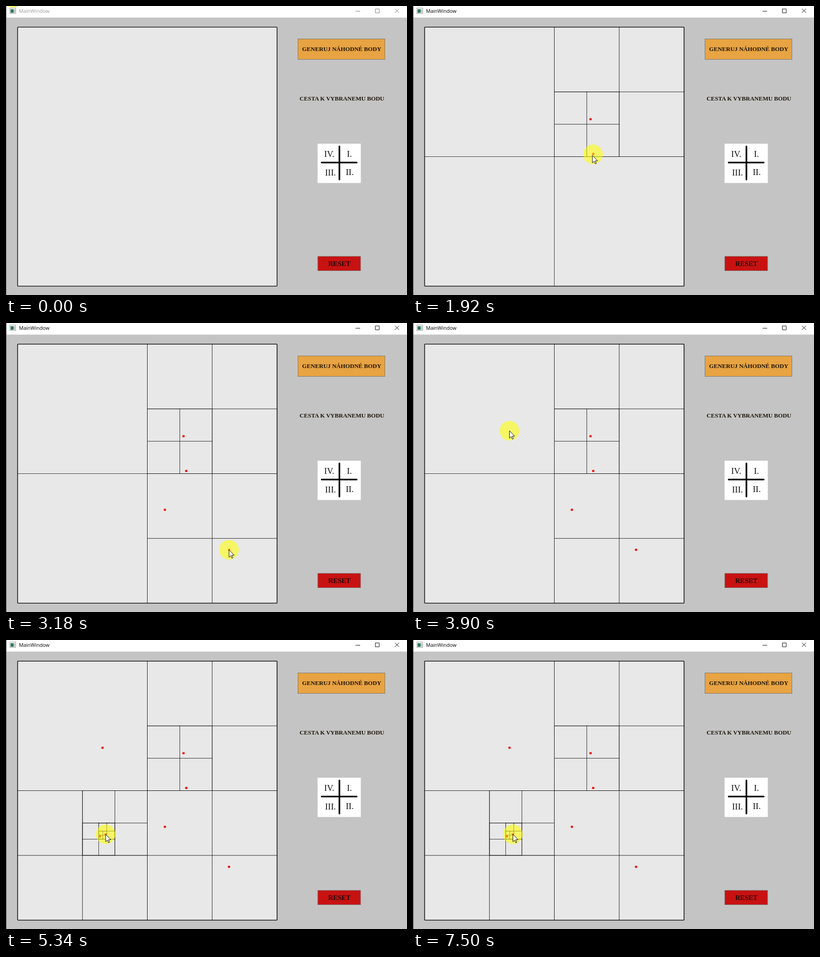
Animation of 881 by 636 pixels, one loop 8000 ms. Source, as an HTML page:

```html
<!DOCTYPE html>
<html lang="cs">
<head>
<meta charset="utf-8">
<title>MainWindow</title>
<style>
  html, body { margin: 0; width: 100%; height: 100%; overflow: hidden; background: #c4c4c4; }
  svg { display: block; width: 881px; height: 636px; }
  .caption { font: 11px "Open Sans", sans-serif; }
  .label { font: bold 13.1px "Liberation Serif", serif; text-anchor: middle; fill: #1c1408; }
  .roman { font: 19px "Liberation Serif", serif; fill: #111; }
  .reset { font-size: 15px; fill: #220505; }
</style>
</head>
<body>
<svg viewBox="0 0 881 636">
  <rect width="881" height="636" fill="#c4c4c4"/>
  <rect width="881" height="25.5" fill="#fff"/>
  <rect id="edge" width="1" height="636"/>

  <rect x="8.5" y="4.5" width="13" height="12" fill="#fff" stroke="#999"/>
  <rect x="10" y="7" width="7" height="8" fill="#2f7d62"/>
  <rect x="18" y="7" width="2" height="8" fill="#aaa"/>
  <text id="caption" class="caption" x="28.5" y="15">MainWindow</text>
  <path id="controls" fill="none" d="M768 11.5h10M811.5 6.5h8.5v8.5h-8.5zM854.5 6l9 9m0-9l-9 9"/>

  <rect id="board" rx="1" fill="#e8e8e8" stroke="#151515" stroke-width="1.6"/>
  <g id="cells" fill="none" stroke="#000" stroke-opacity=".5"/>
  <g id="dots" fill="#f80404"/>

  <rect x="641.5" y="72.5" width="191" height="45" fill="#e8a342" stroke="#7b766c"/>
  <text class="label" x="737.5" y="99">GENERUJ NÁHODNÉ BODY</text>
  <text class="label" x="738" y="208">CESTA K VYBRANEMU BODU</text>

  <rect x="684.5" y="303" width="95" height="86.5" fill="#fff"/>
  <path d="M732.5 309v73M693.5 344.5h77" stroke="#000" stroke-width="3.6" stroke-linecap="round"/>
  <g class="roman">
    <text x="699" y="332">IV.</text>
    <text x="749" y="332">I.</text>
    <text x="701" y="373">III.</text>
    <text x="746.5" y="372">II.</text>
  </g>

  <rect x="685" y="551" width="94" height="31.5" fill="#c81212" stroke="#7d6a6a"/>
  <text class="label reset" x="732.5" y="572">RESET</text>

  <circle id="halo" r="21.6" fill="#ff0" fill-opacity=".56"/>
  <path id="arrow" d="M0 0v16.5l3.8-3.6 2.5 5.7 2.3-1-2.5-5.6h5.2z" fill="#fff" stroke="#000"/>
</svg>
<script>
const LOOP = 8000, STEP = 60, HALO_LAG = 30;
const BOARD = { x: 25.5, y: 46.5, size: 570 };

// Places the pointer visits; those with a click time leave a point behind.
const stop = (x, y, leave, arrive, click) => ({ x, y, leave, arrive, click });
const stops = [
  stop(15, -18, 0, 0),
  stop(390, 249, 120, 450, 780),
  stop(396, 325.5, 780, 1500, 1560),
  stop(349, 411, 1860, 2370, 2460),
  stop(490, 499, 2580, 2850, 3180),
  stop(212, 237, 3480, 3870, 4020),
  stop(206.5, 432, 4020, 4440, 4500),
  stop(219, 427.5, 4860, 5010, 5340),
  stop(295, 513, 5700, 5970),
  stop(294, 494, 6180, 6300),
  stop(230, 428, 6360, 6990),
  stop(219.5, 427.5, 7140, 7320)
];
const clicks = stops.filter(s => s.click);

const byId = id => document.getElementById(id);
const edge = byId("edge"), caption = byId("caption"), controls = byId("controls");
const cells = byId("cells"), dots = byId("dots"), halo = byId("halo"), arrow = byId("arrow");

const ease = p => p * p * (3 - 2 * p);

// Each stop pulls the pointer away from the previous one.
function pointerAt(t) {
  let { x, y } = stops[0];
  for (const s of stops.slice(1)) {
    if (t <= s.leave) break;
    const k = ease(Math.min(1, (t - s.leave) / (s.arrive - s.leave)));
    x += (s.x - x) * k;
    y += (s.y - y) * k;
  }
  return { x, y };
}

// Quadtree with one point per leaf; returns the outlines of all child cells.
function subdivide(x, y, size, points) {
  if (points.length < 2) return "";
  const half = size / 2;
  let out = "";
  for (const cx of [x, x + half]) for (const cy of [y, y + half]) {
    const inside = points.filter(p =>
      p.x >= cx && p.x < cx + half && p.y >= cy && p.y < cy + half);
    out += `<rect x="${cx}" y="${cy}" width="${half}" height="${half}"/>`;
    out += subdivide(cx, cy, half, inside);
  }
  return out;
}

let shown = -1;
function showPoints(points) {
  if (points.length === shown) return;
  shown = points.length;
  cells.innerHTML = subdivide(BOARD.x, BOARD.y, BOARD.size, points);
  dots.innerHTML = points.map(p => `<circle cx="${p.x}" cy="${p.y}" r="2.6"/>`).join("");
  const active = shown > 0;
  edge.setAttribute("fill", active ? "#4a4a4a" : "#777");
  caption.setAttribute("fill", active ? "#000" : "#999");
  controls.setAttribute("stroke", active ? "#000" : "#777");
}

const place = (el, { x, y }) => el.setAttribute("transform", `translate(${x} ${y})`);

function render(time) {
  const t = Math.floor(time / STEP) * STEP;
  showPoints(clicks.filter(s => s.click <= t));
  place(halo, pointerAt(t - HALO_LAG));
  place(arrow, pointerAt(t));
}

const board = byId("board");
board.setAttribute("x", BOARD.x);
board.setAttribute("y", BOARD.y);
board.setAttribute("width", BOARD.size);
board.setAttribute("height", BOARD.size);

const start = performance.now();
function tick() {
  render((performance.now() - start) % LOOP);
  requestAnimationFrame(tick);
}
tick();
</script>
</body>
</html>
```
